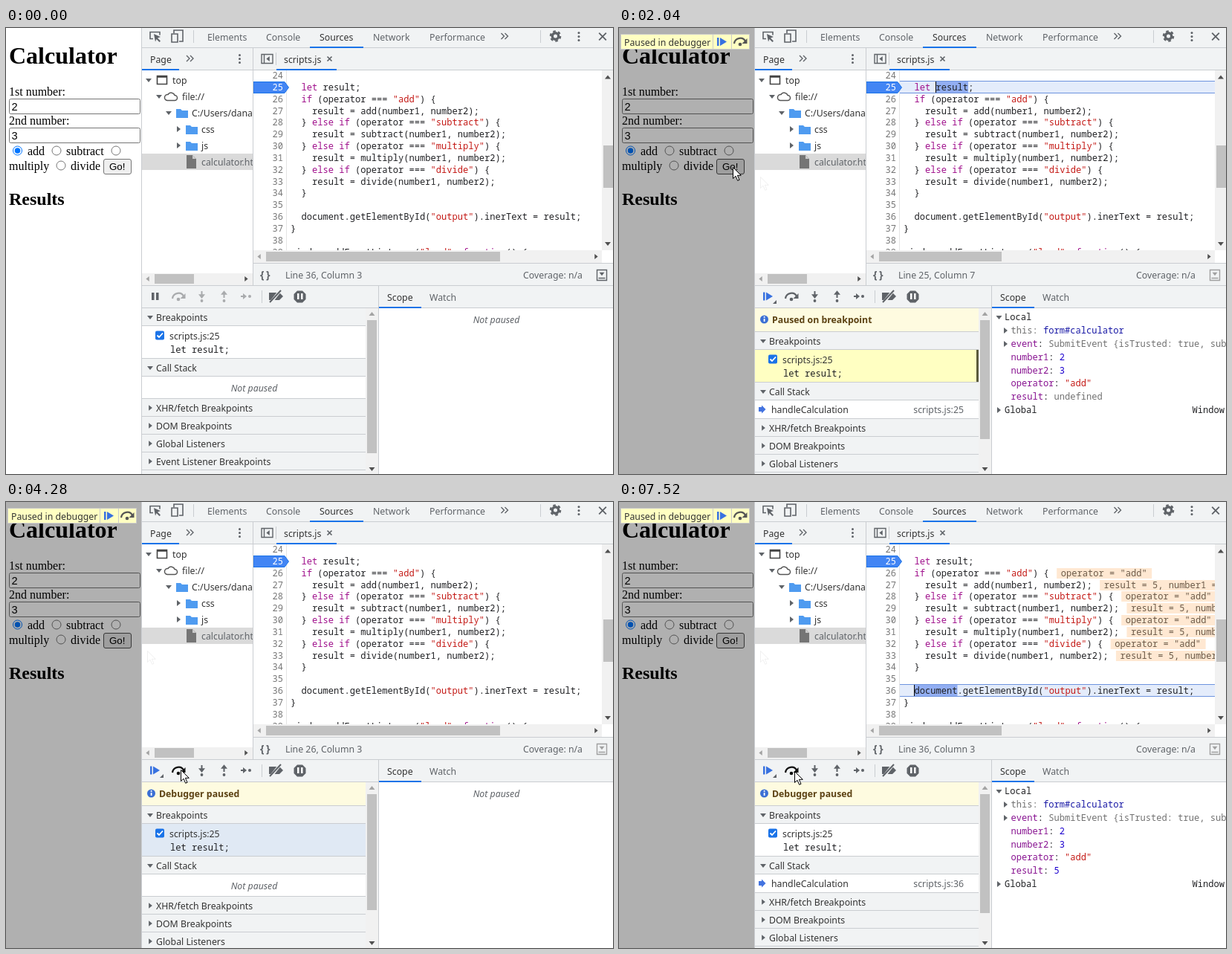
Write an HTML page that moves like this. It is 817x600 px and loops after 8000 ms.

```html
<!DOCTYPE html>
<html lang="en">
<head>
<meta charset="utf-8">
<title>Debugger walkthrough</title>
<style>
html, body { margin: 0; width: 100%; height: 100%; overflow: hidden; background: #fff; }
svg { display: block; }
text { white-space: pre; font: 12.3px "Noto Sans", sans-serif; fill: #333; }
.dim { fill: #5f6368; }
.bold { font-weight: 700; }
.note { font-style: italic; fill: #5f6368; text-anchor: middle; }
.mono { font: 12.08px "Noto Sans Mono", monospace; fill: #202124; }
.num { fill: #777; text-anchor: end; }
.end { text-anchor: end; }
.page { font: 16px "Liberation Serif", serif; fill: #000; }
.h1 { font-size: 32px; font-weight: 700; }
.h2 { font-size: 24px; font-weight: 700; }
.field { font: 14.6px "Liberation Sans", sans-serif; fill: #000; }
.button { font: 13.33px "Liberation Sans", sans-serif; fill: #000; }
</style>
</head>
<body>
<svg id="stage" width="817" height="600">
  <clipPath id="codeClip"><rect x="333" y="57" width="469" height="242"/></clipPath>
  <clipPath id="treeClip"><rect x="183" y="57" width="149" height="273"/></clipPath>
  <g id="scene"></g>
</svg>
<script>
const LOOP = 8000;
const BLUE = '#1a73e8', BAR = '#f1f3f4', EDGE = '#cacdd1', ICON = '#5f6368', THUMB = '#c1c1c1';
const CHAR = 7.248, CODE_X = 383, ROW = 15.83;

const CODE = `
  let result;
  if (operator === "add") {
    result = add(number1, number2);
  } else if (operator === "subtract") {
    result = subtract(number1, number2);
  } else if (operator === "multiply") {
    result = multiply(number1, number2);
  } else if (operator === "divide") {
    result = divide(number1, number2);
  }

  document.getElementById("output").inerText = result;
}

window.addEventListener("load", function() {`.split('\n');

// Each step holds from its time until the next one.
const DEBUG = [
  { t: 0 },
  { t: 2040, line: 25, col: 7, token: 'result', caret: true, hit: true },
  { t: 3030, line: 25, col: 7, token: 'result', hit: true },
  { t: 3780, line: 26, col: 3, token: 'if', caret: true, selected: true },
  { t: 4280, running: true, selected: true },
  { t: 4530, line: 27, col: 5, token: 'result', caret: true },
  { t: 5030, line: 27, col: 5, token: 'result' },
  { t: 5770, line: 36, col: 3, token: 'document', caret: true },
  { t: 7020, line: 36, col: 3, token: 'document' },
  { t: 7520, line: 36, col: 3, token: 'document', caret: true },
];
const POINTER = [
  { t: 0 },
  { t: 250, x: 169, y: 380 },
  { t: 760, x: 190.5, y: 199.5, resize: true },
  { t: 1010, x: 190, y: 199 },
  { t: 1250, x: 153, y: 187 },
  { t: 2270, x: 205.5, y: 167.5, resize: true },
  { t: 2530, x: 197, y: 327 },
  { t: 2780, x: 227, y: 353 },
  { t: 3030, x: 243, y: 355 },
  { t: 3290, x: 235, y: 360 },
  { t: 7270, x: 239, y: 358 },
  { t: 7520, x: 236, y: 362 },
];
const CLICKS = [
  { from: 1770, to: 2040, x: 153, y: 187 },
  { from: 3540, to: 3780, x: 235, y: 360 },
  { from: 5520, to: 5770, x: 235, y: 360 },
];

const at = (steps, t) => steps.findLast(s => s.t <= t);
const text = (x, y, s, cls = '', style = '') => `<text x="${x}" y="${y}" class="${cls}" style="${style}">${s}</text>`;
const rect = (x, y, w, h, fill, extra = '') => `<rect x="${x}" y="${y}" width="${w}" height="${h}" fill="${fill}" ${extra}/>`;
const fill = (d, color, extra = '') => `<path d="${d}" fill="${color}" ${extra}/>`;
const line = (d, color = ICON, w = 1.5) => `<path d="${d}" fill="none" stroke="${color}" stroke-width="${w}"/>`;
const dot = (x, y, r, color = ICON, extra = '') => `<circle cx="${x}" cy="${y}" r="${r}" fill="${color}" ${extra}/>`;
const move = (x, y, body, extra = '') => `<g transform="translate(${x} ${y})" ${extra}>${body}</g>`;
const clip = (id, body) => `<g clip-path="url(#${id})">${body}</g>`;
const span = (s, color, extra = '') => `<tspan style="fill:${color};${extra}">${s}</tspan>`;

const down = (x, y, c = ICON, r = 4) => fill(`M${x - r} ${y - r / 2}h${2 * r}l${-r} ${r * 1.25}z`, c);
const up = (x, y, c = ICON, r = 4) => fill(`M${x - r} ${y + r / 2}h${2 * r}l${-r} ${-r * 1.25}z`, c);
const right = (x, y, c = ICON, r = 4) => fill(`M${x - r / 2} ${y - r}v${2 * r}l${r * 1.25} ${-r}z`, c);
const left = (x, y, c = ICON, r = 4) => fill(`M${x + r / 2} ${y - r}v${2 * r}l${-r * 1.25} ${-r}z`, c);
const cross = (x, y, r, w) => line(`M${x - r} ${y - r}l${2 * r} ${2 * r}m0 ${-2 * r}l${-2 * r} ${2 * r}`, ICON, w);
const dots = (x, y) => [-5, 0, 5].map(d => dot(x, y + d, 1.5)).join('');
const chevrons = (x, y) => line(`M${x} ${y - 4}l4 4-4 4m5-8l4 4-4 4`, ICON, 1.4);

const stepOver = (x, y, c) => move(x, y,
  line('M-8 3C-7-5 4-7 7 0', c, 2.2) + fill('M9.5-4V3H2.5z', c) + dot(0, 4, 2.3, c));
const resume = (x, y) => rect(x, y - 5.5, 2.5, 11, '#3871e0') + fill(`M${x + 4} ${y - 5.5}v11l9-5.5z`, '#3871e0');

function highlight(s) {
  return s.replace(/"\w+"|\b(let|if|else|function)\b/g,
    m => span(m, m[0] === '"' ? '#c41a16' : '#a0108c'));
}

function webPage(t, paused) {
  const hover = t >= 1250;
  const input = (y, v) => rect(4.5, y, 176, 20, '#fff', 'rx="2" stroke="#767676"') + text(7.5, y + 15.5, v, 'field');
  const radio = (x, y, on) => dot(x, y, 6, '#fff', `stroke="${on ? '#0075ff' : '#767676'}"`) + (on ? dot(x, y, 3.8, '#0075ff') : '');
  let s = text(4, 48, 'Calculator', 'page h1')
    + text(4, 91, '1st number:', 'page') + input(95.5, '2')
    + text(4, 130, '2nd number:', 'page') + input(134.5, '3')
    + radio(15.5, 165, true) + text(29, 171, 'add', 'page')
    + radio(68, 165) + text(81, 171, 'subtract', 'page') + radio(148, 165)
    + text(4, 191, 'multiply', 'page') + radio(74, 185) + text(87, 191, 'divide', 'page')
    + rect(131.5, 176.5, 37, 20, hover ? '#e5e5e5' : '#efefef', `rx="2.5" stroke="${hover ? '#4f4f4f' : '#767676'}"`)
    + text(139, 191, 'Go!', 'button')
    + text(4, 238, 'Results', 'page h2');
  if (paused) {
    s += rect(0, 0, 182, 600, '#000', 'opacity=".31"')
      + rect(2.5, 8.5, 173, 20, '#ffffc2', 'stroke="#cacaca"') + text(7, 24, 'Paused in debugger')
      + line('M126.5 9v19M151.5 9v19', '#cacaca', 1)
      + resume(132, 18.5) + stepOver(163, 18, '#555');
  }
  return s;
}

function topBars() {
  const tabs = [[271, 'Elements'], [350, 'Console'], [422, 'Sources'], [494, 'Network'], [570, 'Performance']];
  const gear = dot(739.5, 11, 4.2, 'none', `stroke="${ICON}" stroke-width="3.4"`)
    + dot(739.5, 11, 6.6, 'none', `stroke="${ICON}" stroke-width="2.4" stroke-dasharray="3.6 3.31"`);
  return rect(182, 0, 635, 600, '#fff') + rect(183, 0, 634, 56, BAR)
    + line('M183 26.5H817M183 56.5H817M332.5 27V346M182.5 0V600', EDGE, 1)
    + line('M198 14.5h-4v-9h13v4', ICON, 1.6) + fill('M199 8l9 4-4 1.5 4 4-1.5 1.5-4-4-1.5 3.5z', ICON)
    + line('M226 7V3h12v15h-5M223 8h8v11h-8z', ICON, 1.6)
    + line('M252.5 3v17M719.5 3v17', EDGE, 1)
    + tabs.map(([x, s]) => text(x, 17, s, s === 'Sources' ? '' : 'dim')).join('')
    + rect(409, 25, 72, 2, BLUE) + chevrons(666.5, 11) + gear + dots(771, 11.5) + cross(803, 11.5, 4.8, 1.9)
    + text(194, 47, 'Page') + rect(183, 55, 50, 2, BLUE) + chevrons(243, 41) + dots(314.5, 41.5)
    + line('M344 35.5h15v12h-15zM347.5 36v11', ICON, 1.4) + left(353, 41.5, ICON, 3.5)
    + line('M363.5 33v17', EDGE, 1)
    + text(374, 47, 'scripts.js') + cross(435.5, 41.5, 3, 1.7) + rect(364, 55, 81, 2, BLUE);
}

function fileTree() {
  const folder = (x, y) => fill(`M${x} ${y - 6}h6l2 2h8v10h-16z`, '#4f9bf0');
  const tree = rect(183, 169, 149, 22, '#dadada')
    + down(192, 70) + line('M203.5 64.5h13v11h-13zM203.5 66h13', '#444', 1.6) + text(224, 75, 'top')
    + down(206, 92) + line('M217 97.5h10a3.5 3.5 0 0 0 0-7a5 5 0 0 0-9-1a4 4 0 0 0-1 8z', '#555', 1.5) + text(237, 97, 'file://')
    + down(219, 114) + folder(229, 115) + text(250, 119, 'C:/Users/dana')
    + right(232, 136) + folder(242, 137) + text(263, 141, 'css')
    + right(232, 158) + folder(242, 159) + text(263, 163, 'js')
    + fill('M243 171h8l5 5v13h-13z', '#757575') + fill('M251 171v5h5z', '#ccc')
    + text(263, 185, 'calculator.html', 'dim');
  return clip('treeClip', tree)
    + rect(183, 330, 149, 16, '#f1f1f1') + rect(200, 331, 53, 13, THUMB)
    + left(191, 337.5, '#a3a3a3', 3.5) + right(323, 337.5, '#505050', 3.5);
}

function editor(state) {
  const rowTop = n => Math.round(72 + (n - 25) * ROW);
  let s = line('M377.5 57V299', '#e4e4e4', 1);
  if (state.line) {
    const y = rowTop(state.line), x = CODE_X + (state.col - 1) * CHAR;
    s += rect(378, y, 424, 15, '#e4ecfb') + line(`M378 ${y - .5}H802M378 ${y + 15.5}H802`, '#6d93de', 1)
      + rect(x, y, state.token.length * CHAR, 15, '#92aef2')
      + (state.caret ? rect(Math.floor(x - .4), y, 1, 15, '#000') : '');
  }
  s += fill('M333 72.500h42l5.500 7.500-5.500 7.500h-42z', '#4285f4', `stroke="${BLUE}"`);
  CODE.forEach((src, i) => {
    const n = 24 + i, y = rowTop(n) + 12;
    s += text(373, y, n, 'mono num', n === 25 ? 'fill:#fff' : '') + text(CODE_X, y, highlight(src), 'mono');
    const value = /if \(/.test(src) ? 'operator = "add"'
      : /result = \w+\(/.test(src) ? 'result = 5, number1 = 2, number2 = 3' : '';
    if (value && n < state.line) {
      const x = CODE_X + src.length * CHAR;
      s += rect(x + 10.5, y - 11, value.length * CHAR + 12, 14, '#ffe8d2')
        + text(x + 16, y, value, 'mono', 'fill:#6b5a48');
    }
  });
  const pos = state.line ? [state.line, state.col] : state.running ? [26, 3] : [36, 3];
  const foldIcon = state.line || state.running ? '#a0a0a0' : ICON;
  return clip('codeClip', s)
    + rect(802, 57, 15, 242, '#f1f1f1') + rect(804, 158, 13, 57, THUMB) + up(810, 66.5, '#505050') + down(810, 290, '#505050')
    + rect(333, 299, 469, 17, '#f1f1f1') + rect(350, 301, state.line ? 165 : 315, 13, THUMB)
    + left(341, 307.5, '#a3a3a3', 3.5) + right(794, 307.5, '#505050', 3.5)
    + rect(333, 316, 484, 30, BAR) + line('M333 316.5H817', EDGE, 1)
    + text(342, 337, '{ }', 'bold dim', 'letter-spacing:-.6px;font-size:14px')
    + text(376, 337, `Line ${pos[0]}, Column ${pos[1]}`, 'dim') + text(776, 337, 'Coverage: n/a', 'dim end')
    + line('M795.5 325.5h13v14h-13zM797.5 336.5h9', foldIcon, 1.4) + down(802, 330.5, foldIcon, 3.5);
}

function debugBar(t, paused) {
  const color = paused ? ICON : '#a9abad';
  const pauseIcon = rect(196, 356, 3.5, 10, ICON) + rect(202, 356, 3.5, 10, ICON);
  return rect(183, 347, 634, 29, BAR) + line('M183 346.5H817M183 376.5H817M501.5 347V600', EDGE, 1)
    + (paused ? resume(194, 361) + fill('M212 366v5h-5z', ICON) : pauseIcon)
    + stepOver(232, 361, paused && t >= 2780 ? '#111' : color)
    + line('M263.5 354v6M293.5 363v-6M316 361h5', color, 2)
    + down(263.5, 360.5, color, 4.5) + up(293.5, 356.5, color, 4.5) + right(321, 361, color, 4)
    + dot(263.5, 367, 1.9, color) + dot(293.5, 367, 1.9, color) + dot(328, 361, 2, color)
    + line('M344.5 353v17', EDGE, 1)
    + fill('M354 356h14l5 5-5 5h-14z', ICON) + line('M355 371L370 352', BAR, 4) + line('M355 369L370 353', ICON, 2)
    + fill('M392 353.5h7l4.5 4.5v7l-4.5 4.5h-7l-4.5-4.5v-7z', ICON)
    + rect(392, 357, 2.5, 8, '#fff') + rect(397, 357, 2.5, 8, '#fff')
    + text(513, 367, 'Scope') + text(570, 367, 'Watch', 'dim') + rect(502, 375, 57, 2, BLUE);
}

function sidebar(state) {
  const paused = state.line || state.running;
  let y = 377, s = '';
  const header = (title, open) => {
    s += rect(183, y, 301, 24, BAR) + line(`M183 ${y - .5}h301M183 ${y + 23.5}h301`, EDGE, 1)
      + (open ? down : right)(194, y + 12, ICON, open ? 4 : 3.8) + text(202, y + 17, title);
    y += 24;
  };
  if (paused) {
    s += rect(183, y, 301, 32, '#fefbe0') + dot(195.5, 392, 5.5, '#3b6fd4')
      + rect(194.7, 391, 1.8, 4, '#fff') + rect(194.7, 388, 1.8, 1.8, '#fff')
      + text(206, 397, state.hit ? 'Paused on breakpoint' : 'Debugger paused', 'bold', 'fill:#5c4213');
    y += 32;
  }
  header('Breakpoints', true);
  if (state.hit) s += rect(183, y, 301, 44, '#ffffc2') + rect(481, y, 3, 44, '#5b5a3c');
  else if (state.selected) s += rect(183, y, 301, 44, '#e0e9f4');
  s += rect(201, y + 6.5, 12, 12, BLUE, 'rx="2"') + line(`M203.5 ${y + 12.5}l2.5 2.5 5-5.5`, '#fff', 1.8)
    + text(220, y + 18, 'scripts.js:25') + text(221, y + 36, 'let result;', 'mono');
  y += 44;
  header('Call Stack', true);
  if (state.line) {
    s += fill(`M188 ${y + 9}h4v-2.5l5.5 5.5-5.5 5.5v-2.5h-4z`, '#4373e0')
      + text(205, y + 17, 'handleCalculation') + text(464, y + 17, `scripts.js:${state.line}`, 'dim end');
    y += 25;
  } else {
    s += text(334, y + 20, 'Not paused', 'note');
    y += 30;
  }
  ['XHR/fetch Breakpoints', 'DOM Breakpoints', 'Global Listeners', 'Event Listener Breakpoints', 'CSP Violation Breakpoints']
    .forEach(title => header(title));
  const thumbEnd = state.line ? 553 : state.running ? 549 : 572;
  return s + rect(484, 377, 17, 223, '#f1f1f1') + rect(486, 393, 13, thumbEnd - 393, THUMB)
    + up(492.5, 385, '#a3a3a3') + down(492.5, 593, '#505050');
}

function scope(state) {
  if (!state.line) return text(660, 397, 'Not paused', 'note');
  const grey = '#727272', number = '#1c00cf';
  const name = s => span(s, '#881391', 'font-weight:500') + ': ';
  const rows = [
    'Local',
    span('this: ', grey) + span('form#calculator', '#1a1aa6'),
    name('event') + span('SubmitEvent {isTrusted: true, submitter: button}', grey),
    name('number1') + span('2', number),
    name('number2') + span('3', number),
    name('operator') + span('"add"', '#c41a16'),
    name('result') + (state.line === 36 ? span('5', number) : span('undefined', grey)),
    'Global',
  ];
  return rows.map((row, i) => {
    const outer = i % 7 === 0, mid = Math.round(389.4 + i * 17.8);
    const arrow = i === 0 ? down(511.5, mid) : i === 7 ? right(511, mid) : i < 3 ? right(520, mid) : '';
    return arrow + text(outer ? 519 : 527.5, mid + 4, row, 'mono');
  }).join('') + text(815, 518, 'Window', 'mono end');
}

const arrowShape = '<path d="M.5.5V15.5L4 12.2 6.7 18.3 9 17.3 6.4 11.3H11.3z" stroke-width="1"/>';
function pointer(t) {
  const p = at(POINTER, t), click = CLICKS.find(c => t >= c.from && t < c.to);
  let s = '';
  if (t >= 1250) s += move(190, 200, arrowShape, 'fill="none" stroke="#000" opacity=".06"');
  if (click) s += dot(click.x, click.y, 12, '#f5e600', 'opacity=".7"');
  if (p.resize) {
    s += move(p.x, p.y, '<path d="M-11 0l5-4.2v3.2h12v-3.2l5 4.2-5 4.2v-3.2h-12v3.2z"/>', 'fill="#fff" stroke="#000"');
  } else if (p.t) s += move(p.x, p.y, arrowShape, 'fill="#fff" stroke="#000"');
  return s;
}

function render(t) {
  const state = at(DEBUG, t), paused = state.line || state.running;
  return webPage(t, paused) + topBars() + fileTree() + editor(state)
    + debugBar(t, paused) + sidebar(state) + scope(state) + pointer(t);
}

const scene = document.getElementById('scene');
let shown = '';
function tick() {
  const next = render(performance.now() % LOOP);
  if (next !== shown) scene.innerHTML = shown = next;
  requestAnimationFrame(tick);
}
tick();
</script>
</body>
</html>
```
